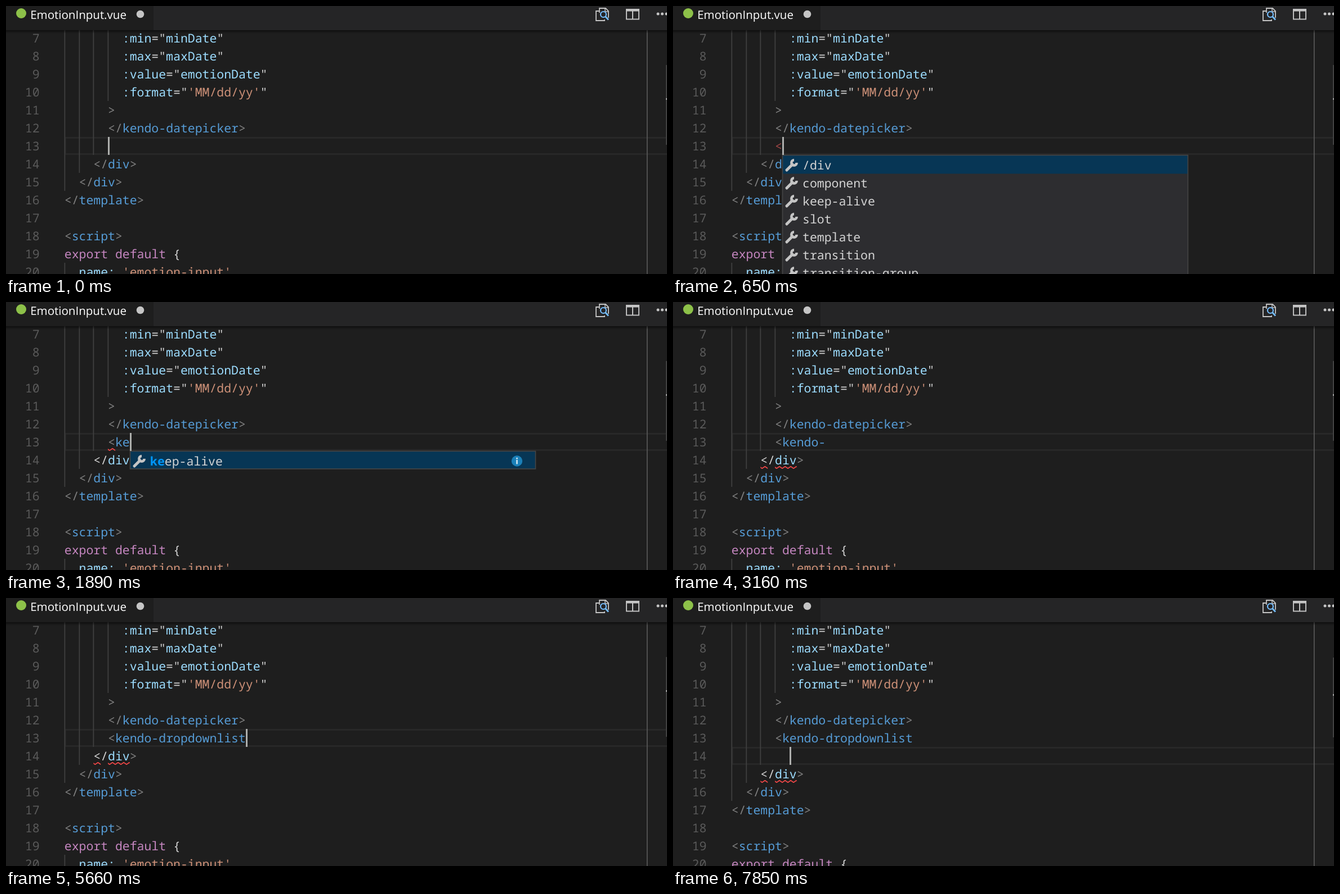
Animation of 1174 by 477 pixels, one loop 8000 ms. Source, as an HTML page with a canvas:

```html
<!DOCTYPE html>
<html lang="en">
<head>
<meta charset="utf-8">
<title>Editor typing</title>
<style>
  html, body { margin: 0; height: 100%; overflow: hidden; background: #1e1e1e; }
  canvas { display: block; }
</style>
</head>
<body>
<canvas id="stage" width="1174" height="477"></canvas>
<script>
const ctx = document.getElementById('stage').getContext('2d');
ctx.textRendering = 'geometricPrecision';

const LOOP = 8000, LEFT = 103.8, CHAR = 12.88, ROW = 32, FIRST = 7;
const MONO = '21.47px "Noto Sans Mono", monospace';
const GRAY = '#808080', BLUE = '#569cd6', CYAN = '#9cdcfe', PLAIN = '#d4d4d4',
      ORANGE = '#ce9178', PINK = '#c586c0', RED = '#f44747';

const TYPED = '<kendo-dropdownlist\n  ';
// [time, characters typed, cursor visible]
const STEPS = [
  [0, 0, 1], [330, 0, 0], [650, 1, 1], [1280, 1, 0], [1590, 1, 1], [1890, 3, 1],
  [2210, 6, 1], [2520, 7, 1], [3160, 7, 0], [3450, 9, 1], [3780, 12, 1],
  [4100, 14, 1], [4400, 15, 1], [4720, 17, 1], [5010, 18, 1], [5660, 19, 1],
  [5970, 20, 1], [6590, 20, 0], [6910, 22, 1], [7560, 22, 0], [7850, 22, 1]
];
const SUGGESTIONS = ['/div', 'component', 'keep-alive', 'slot', 'template',
                     'transition', 'transition-group'];

const colX = col => LEFT + col * CHAR;
const rowY = line => 41 + (line - FIRST) * ROW;

function rect(x, y, w, h, color) {
  ctx.fillStyle = color;
  ctx.fillRect(x, y, w, h);
}
function frame(x, y, w, h, color, width) {
  ctx.strokeStyle = color;
  ctx.lineWidth = width;
  ctx.strokeRect(x, y, w, h);
}
function circle(x, y, r, color) {
  ctx.fillStyle = color;
  ctx.beginPath();
  ctx.arc(x, y, r, 0, 7);
  ctx.fill();
}
function line(points, color, width) {
  ctx.strokeStyle = color;
  ctx.lineWidth = width;
  ctx.beginPath();
  points.forEach(p => ctx.lineTo(...p));
  ctx.stroke();
}
function text(str, x, y, color, font = MONO) {
  ctx.font = font;
  ctx.fillStyle = color;
  ctx.fillText(str, x, y);
}

// A code line is [indent, color, text, color, text, ...]
const tag = (indent, open, name) => [indent, GRAY, open, BLUE, name, GRAY, '>'];
const attr = (name, value, color = CYAN) =>
  [8, CYAN, ':' + name, PLAIN, '="', color, value, PLAIN, '"'];

function codeLines(count) {
  const [first, ...rest] = TYPED.slice(0, count).split('\n');
  const broken = count >= 3;
  return [
    attr('min', 'minDate'),
    attr('max', 'maxDate'),
    attr('value', 'emotionDate'),
    attr('format', "'MM/dd/yy'", ORANGE),
    [6, GRAY, '>'],
    tag(6, '</', 'kendo-datepicker'),
    [6, broken ? GRAY : '#a04646', first.slice(0, 1), BLUE, first.slice(1)],
    ...rest.map(() => [0]),
    broken ? [4, PLAIN, '</', CYAN, 'div', GRAY, '>'] : tag(4, '</', 'div'),
    tag(2, '</', 'div'),
    tag(0, '</', 'template'),
    [0],
    tag(0, '<', 'script'),
    [0, PINK, 'export default', PLAIN, ' {'],
    [2, CYAN, 'name:', ORANGE, " 'emotion-input'", PLAIN, ',']
  ];
}

function drawCode(lines) {
  lines.slice(0, 14).forEach(([col, ...tokens], i) => {
    const number = FIRST + i, y = rowY(number) + 24;
    ctx.textAlign = 'right';
    text(number, 59.6, y, '#5a5a5a');
    ctx.textAlign = 'left';
    for (let k = 0; k < tokens.length; k += 2) {
      text(tokens[k + 1], colX(col), y, tokens[k]);
      col += tokens[k + 1].length;
    }
  });
}

function drawGuides(shift) {
  const guide = (col, from, to) =>
    rect(Math.round(colX(col)) - 0.5, rowY(from), 1.7, rowY(to) - rowY(from), '#404040');
  guide(0, 7, 16 + shift);
  guide(2, 7, 15 + shift);
  guide(4, 7, 14 + shift);
  guide(6, 7, 11);
  guide(0, 20 + shift, 21 + shift);
}

function squiggle(col, length, number) {
  const x = colX(col), y = rowY(number) + 27, w = length * CHAR;
  const points = [];
  for (let i = -1; i * 5 < w + 5; i++) points.push([x + 3 + i * 5, y + (i % 2 ? 0.8 : 4.2)]);
  ctx.save();
  ctx.beginPath();
  ctx.rect(x, y, w, 5);
  ctx.clip();
  line(points, RED, 1.7);
  ctx.restore();
}

function wrench(x, y) {
  ctx.lineCap = 'round';
  line([[x - 9, y + 9], [x + 1, y - 1]], '#c5c5c5', 5);
  ctx.lineCap = 'butt';
  ctx.lineWidth = 4.5;
  ctx.beginPath();
  ctx.arc(x + 4, y - 4, 4.7, 0, Math.PI * 1.5);
  ctx.stroke();
}

function drawPopup(col, items, prefix) {
  const x = Math.round(colX(col)) + 0.5, y = 265.5, height = items.length * ROW;
  rect(x, y, 720, height, '#2d2d30');
  rect(x, y, 720, Math.min(ROW + 1, height), '#073655');
  frame(x, y, 720, height - 0.5, '#454545', 1.6);
  items.forEach((item, i) => {
    const mid = 283 + i * ROW, tx = x + 35.5;
    wrench(x + 16.5, mid);
    text(item.slice(prefix.length), tx + prefix.length * CHAR, mid + 8, PLAIN);
    text(prefix, tx, mid + 8, '#0097fb', 'bold ' + MONO);
  });
  if (prefix) {
    circle(x + 687, 283, 9.7, '#1b80b8');
    rect(x + 685.7, 281, 2.6, 7.5, '#d4e6f0');
    rect(x + 685.7, 277, 2.6, 2.6, '#d4e6f0');
  }
}

function drawHeader() {
  rect(0, 0, 1174, 43, '#252526');
  rect(0, 0, 262, 43, '#1e1e1e');
  const shade = ctx.createLinearGradient(0, 43, 0, 49);
  shade.addColorStop(0, 'rgba(0,0,0,.5)');
  shade.addColorStop(1, 'rgba(0,0,0,0)');
  rect(0, 43, 1174, 6, shade);

  circle(27, 13, 9, '#8dc149');
  text('EmotionInput.vue', 43.2, 23, '#ffffff', '20.5px "Open sans", "Open Sans", sans-serif');
  circle(238.5, 14.5, 6.8, '#c5c5c5');

  // Page with magnifier
  line([[1053, 9], [1048, 9], [1048, 26], [1063, 26], [1063, 24]], '#c5c5c5', 1.8);
  line([[1054, 12], [1054, 4], [1065, 4], [1070, 9], [1070, 21]], '#c5c5c5', 1.8);
  line([[1064, 4], [1064, 10], [1070, 10]], '#c5c5c5', 1.5);
  ctx.strokeStyle = '#75beff';
  ctx.lineWidth = 2.2;
  ctx.beginPath();
  ctx.arc(1061, 15, 5, 0, 7);
  ctx.stroke();
  line([[1064.5, 18.5], [1070, 24.5]], '#75beff', 2.8);

  // Split view
  frame(1102, 6, 22, 17.5, '#c5c5c5', 1.9);
  rect(1101, 5, 24, 4.5, '#c5c5c5');
  rect(1112, 6, 2, 17, '#c5c5c5');

  [1158, 1165.5, 1173].forEach(x => circle(x, 14, 2.5, '#c5c5c5'));
}

function draw(now) {
  const time = now % LOOP;
  const [, count, cursorOn] = STEPS.filter(step => step[0] <= time).pop();
  const shift = count > 19 ? 1 : 0;
  const active = 13 + shift;
  const cursorCol = 6 + (shift ? count - 20 : count);

  rect(0, 0, 1174, 477, '#1e1e1e');
  frame(105.2, rowY(active) + 1.5, 1080, ROW - 3, '#292929', 2.8);
  drawGuides(shift);
  drawCode(codeLines(count));

  if (time >= 960 && count <= 3) squiggle(6, 1, 13);
  if (count >= 6) {
    squiggle(4, 1, 14 + shift);
    squiggle(6, 3, 14 + shift);
  }

  rect(1138, 43, 1.5, 434, '#5f5f5f');
  rect(1172, 105 + shift, 2, 142, '#424242');
  rect(1172, 164 + shift * 7, 2, 3, '#a0a0a0');
  drawHeader();

  if (count === 1) drawPopup(7, SUGGESTIONS, '');
  if (count === 3) drawPopup(9, ['keep-alive'], 'ke');
  if (cursorOn) rect(Math.round(colX(cursorCol)), rowY(active), 3, ROW, '#aeafad');

  requestAnimationFrame(() => draw(performance.now()));
}
draw(0);
</script>
</body>
</html>
```
